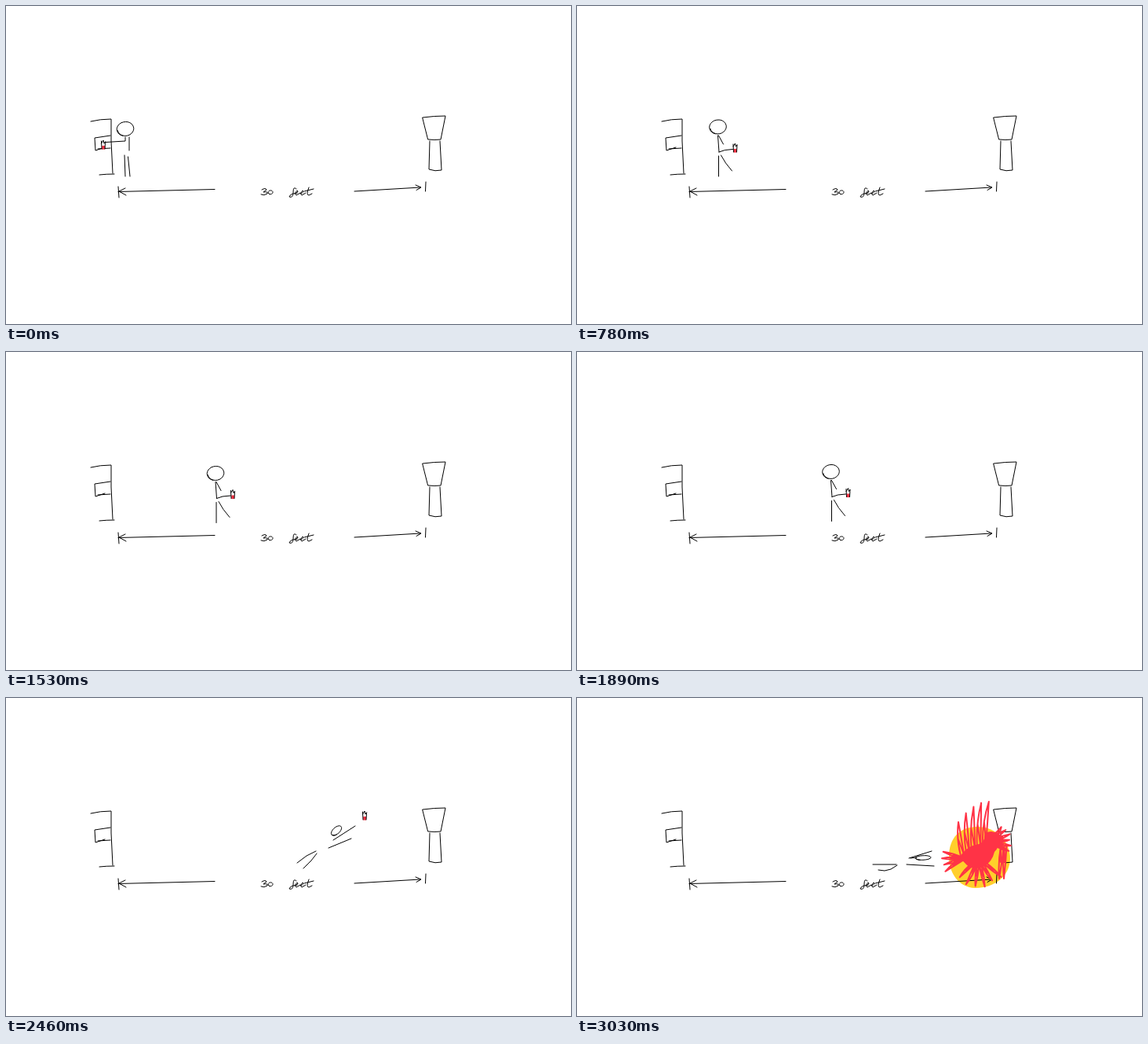
An HTML page that plays this animation: 720 by 405 pixels, repeating every 3600 ms.

```html
<!DOCTYPE html>
<html lang="en">
<head>
<meta charset="utf-8">
<title>30 feet</title>
<style>
html, body { margin: 0; width: 100%; height: 100%; overflow: hidden; background: #fff; }
svg { display: block; width: 100vw; height: 100vh; }
.ink, .fire { fill: none; stroke-linecap: round; stroke-linejoin: round; }
.ink { stroke: #000; stroke-width: 1; }
.fire { stroke: #ff3346; stroke-width: 2; }
</style>
</head>
<body>
<svg viewBox="0 0 720 405" xmlns="http://www.w3.org/2000/svg">
  <path class="blast" fill="#ffcf2b" d="M474 202 C474 178 488 164 510 164 C534 164 552 182 552 205 C551 229 530 242 507 242 C487 241 474 224 474 202Z"/>
  <g class="ink">
    <path d="M108 147 Q120 144 134 144 L134 172 L136 213 M119 215 Q128 214 138 214"/>
    <path d="M133 165 L113 168 L114 184 L126 180 M117 182 L133 181"/>
    <path d="M531 142 Q546 140 560 140 L554 170 Q546 171 538 170 Z"/>
    <path d="M540 172 L539 208 Q547 211 555 209 L553 172"/>
    <path d="M143 230 L144 244 M143 236.5 L266 233.5 M152 232 L144 236 L153 241"/>
    <path d="M444 236 L528 231 M522 228 L529 231 L523 234.5 M535 224 L534.5 236"/>
    <path id="three" d="M326 234 Q331 231 332 234 L328 237 Q334 236 333 239 Q329 242 325 240"/>
    <path id="foot" d="M370 233 Q366 229 366 237 Q366 245 361 243 Q362 239 371 238 M386 231 Q382 241 386 241 L390 239 M380 236 L392 233"/>
    <g id="rounds"></g>
  </g>
  <path id="man" class="ink"/>
  <g id="can">
    <rect x="-1.8" y="1" width="3.8" height="4.6" fill="#f23345"/>
    <path class="ink" stroke-width=".8" d="M-2.5 -5 L-2 5 M2.5 -4 L2 5 M-2.5 -2 L0 -6 L1 -2 L2.5 -4"/>
  </g>
  <g class="blast">
    <path id="flames" class="fire"/>
    <path fill="#ff3346" d="M487 204 Q494 191 507 187 Q517 186 519 179 Q518 170 528 170 Q539 171 539 181 Q538 190 532 196 Q529 209 518 215 Q506 220 497 213 Q493 208 487 204Z"/>
  </g>
</svg>
<script>
const LOOP = 3600, HOLD = 570, FRAME = 30;
const $ = id => document.getElementById(id);

// one pen stroke through the given points
const pen = (...p) => p.map((v, i) => (i % 2 ? " " : i ? "L" : "M") + v.toFixed(1)).join("");

// hand-drawn ellipse whose end overlaps its start, slightly inside
function oval(cx, cy, rx, ry, turn = -.15) {
  const pts = [], c = Math.cos(turn), s = Math.sin(turn);
  for (let i = 0; i <= 28; i++) {
    const a = 2 + i * Math.PI / 12, k = 1 - Math.max(0, i - 22) * .015;
    const x = rx * k * Math.cos(a), y = ry * k * Math.sin(a);
    pts.push(cx + x * c - y * s, cy + x * s + y * c);
  }
  return pen(...pts);
}
const head = (x, y) => oval(x, y, 10.8, 9);

// lower-case loops of the lettering
const rounds = oval(337, 237.3, 3, 2.4)
  + [368, 375].map(x => `M${x} 239 Q${x + 6} 237 ${x + 3} 235 Q${x - 1} 239 ${x + 2} 241 L${x + 7} 238`).join("");
$("rounds").innerHTML = `<path d="${rounds}"/>`;

const stride = pen(1, 37, 1, 63) + pen(4, 36, 10, 46, 18, 56);
const passing = pen(0, 37, -3, 48, -5, 63) + pen(4, 37, 5.5, 48, 5, 63);

// upright figure, head at (x, y); legs alternate
function walker([x, y], i) {
  const up = i % 4 === 2, reach = up ? 17 : 22;
  const body = head(0, 0) + pen(0, 11, 1.5, 32) + pen(1, 11, 7, 22)
    + pen(1.5, 32, 9, 29.5, reach - 3, 28.5);
  return { d: body + (i % 2 ? stride : passing), at: [x, y], can: [x + reach, y + 27] };
}

const steps = [[158.5, 150.5], [179.5, 154], [197, 147.5], [219, 154.5], [243.5, 155.5],
  [267, 154.5], [294, 147.5], [323.5, 152.5]].map(walker);
const lastStep = { ...steps[7], at: [362, 149.5], can: [384, 176.5] };

const pose = (d, ...can) => ({ d, at: [0, 0], can });
const grab = head(152, 156.5) + pen(127, 173.5, 152, 172, 152, 167)
  + pen(157, 167, 157, 184) + pen(151, 190, 152, 217) + pen(155.5, 192, 158, 217);
const windup = head(367.5, 148) + pen(366, 158, 364, 181) + pen(367, 160, 373, 170, 381, 165)
  + stride.replace(/M/g, "M") ;
const dive = oval(421, 169, 8, 4.2, -.73) + pen(417, 181, 445, 163) + pen(411, 191, 440, 179)
  + pen(371, 210, 383, 201, 395, 195) + pen(379, 217, 389, 207, 396, 198);
const flat = oval(441, 203.5, 10, 2.8, -.05) + pen(423, 204, 452, 195) + pen(425, 204, 433, 203)
  + pen(420, 212, 455, 214) + pen(377, 212, 407, 212) + pen(384, 219, 392, 220, 400, 218, 408, 213);

// same legs as the last step, upper body drawn back
const throwing = {
  d: head(5.5, -1.5) + pen(4, 9, 2, 31) + pen(5, 11, 11, 21, 19, 16) + stride,
  at: lastStep.at, can: [383, 162]
};

const poses = [pose(grab, 124, 177), ...steps, lastStep, throwing, pose(dive, 457, 150),
  pose(flat, 511.5, 174.5), pose(flat, 534.5, 206.5), { ...pose(flat, 0, 0), blast: true }];

// the first pose holds, the rest follow at about 6.3 frames each
const startOf = i => i ? HOLD + FRAME * Math.round(6.3 * (i - 1) + .25) : 0;

let seed = 7;
const rnd = () => (seed = seed * 16807 % 2147483647) / 2147483647;
const jit = n => (rnd() - .5) * n;

// thin bent loop from root to tip and back
function flame(x, y, tx, ty, w, bend = 0) {
  const n = Math.hypot(tx - x, ty - y), ox = (y - ty) / n * w, oy = (tx - x) / n * w;
  const mx = (x + tx) / 2 + bend, my = (y + ty) / 2;
  return `M${x - ox} ${y - oy}Q${mx - ox} ${my - oy} ${tx} ${ty}`
    + `Q${mx + ox * 2} ${my + oy * 2} ${x + ox} ${y + oy}L${mx} ${my}`;
}

// n flames spread from angle a to b (degrees) around (x, y)
function fan(n, x, y, a, b, r0, r1) {
  let d = "";
  for (let i = 0; i < n; i++) {
    const q = (a + (b - a) * i / (n - 1)) * Math.PI / 180, r = r1 + jit(5);
    d += flame(x + r0 * Math.cos(q), y + r0 * Math.sin(q),
      x + r * Math.cos(q), y + r * Math.sin(q), 1.4, jit(5));
  }
  return d;
}

function flames() {
  let d = "";
  for (let i = 0; i < 5; i++) {
    const k = 1 - i / 4;
    d += flame(491 + 7 * i, 200 - 4 * i, 486 + 9.7 * i, 132 + 26 * k * k, 2.2, -3);
  }
  d += fan(6, 525, 183, -50, 25, 8, 27);
  d += fan(4, 492, 205, 145, 200, 0, 26);
  d += fan(6, 512, 204, 40, 135, 10, 35);
  d += flame(542, 188, 538, 230, 1.8) + flame(546, 188, 544, 230, 1.5);
  return d;
}
$("flames").setAttribute("d", flames());

function draw(t) {
  const p = poses.findLast((_, i) => startOf(i) <= t);
  $("man").setAttribute("d", p.d);
  $("man").setAttribute("transform", `translate(${p.at})`);
  $("can").setAttribute("transform", `translate(${p.can})`);
  $("can").style.display = p.blast ? "none" : "";
  for (const el of document.querySelectorAll(".blast")) el.style.display = p.blast ? "" : "none";
}

const start = performance.now();
function tick() {
  draw((performance.now() - start) % LOOP);
  requestAnimationFrame(tick);
}
tick();
</script>
</body>
</html>
```
